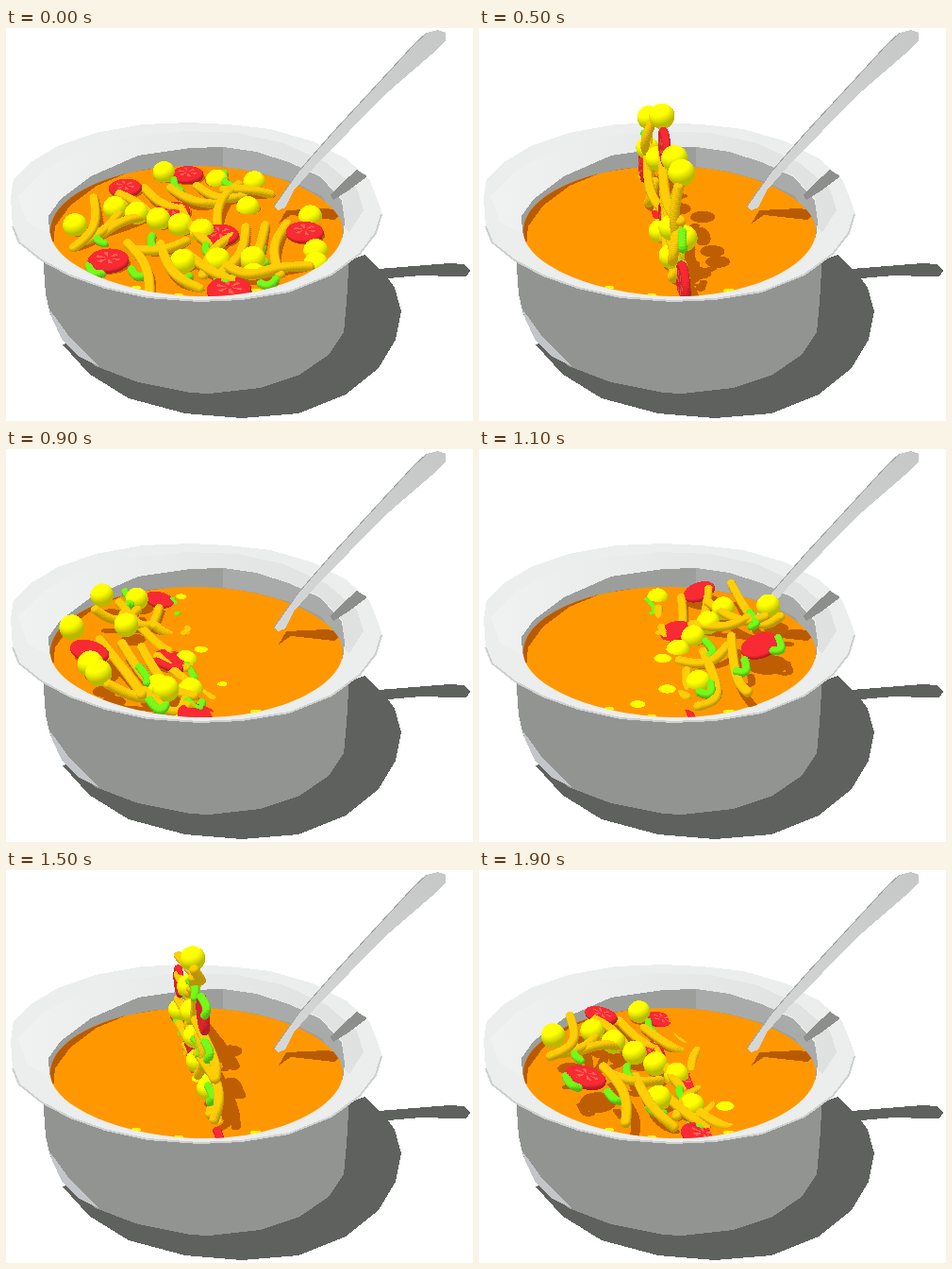
Animation, 495 px wide and 416 px high, one loop 2 s. Source, as an HTML page with a canvas:

```html
<!DOCTYPE html>
<html lang="en">
<head>
<meta charset="utf-8">
<title>Soup bowl</title>
<style>
  html, body { margin: 0; width: 100%; height: 100%; overflow: hidden; background: #fff; }
  svg, canvas { position: absolute; left: 0; top: 0; width: 495px; height: 416px; }
  canvas { clip-path: path("M0 0H495V215H357C357 252 290 284 210 284S47 252 47 215H0Z"); }
</style>
</head>
<body>
<svg viewBox="0 0 495 416" shape-rendering="crispEdges">
  <defs>
    <linearGradient id="rim">
      <stop offset="0" stop-color="#f0f1f1"/><stop offset="1" stop-color="#dfe1e1"/>
    </linearGradient>
    <linearGradient id="spoon" x1="1" y1="0" x2="0" y2="1">
      <stop offset="0" stop-color="#c6c8c7"/><stop offset="1" stop-color="#d6d8d7"/>
    </linearGradient>
    <clipPath id="soup">
      <path d="M47 215C47 177 115 146 200 146S357 180 357 215 290 284 210 284 47 252 47 215Z"/>
    </clipPath>
  </defs>

  <path fill="#5f615f" d="M60 335L88 366 130 392 190 408 250 413 310 408 360 388 395 360 413 330 419 300 412 275 405 265 440 262 475 263 488 263 492 257 485 250 470 249 395 255 380 240 200 300Z"/>
  <path fill="#929491" d="M39 240L42 282 47 303 60 330 95 358 140 375 195 386 215 387 270 381 311 367 342 346 358 322 361 290 364 240Z"/>
  <path fill="#c3c6c9" d="M46 298L53 307 68 328 98 358 78 348 60 331 49 308Z"/>

  <path fill="#eceded" d="M5 180L8 160 25 143 55 125 95 111 145 102 195 100 235 102 280 107 325 120 360 138 385 160 395 185 399 197 393 218 375 240 345 262 300 280 250 288 205 290 150 286 105 276 68 263 38 247 14 227 7 210Z"/>
  <path fill="none" stroke="#cfd1d0" stroke-width="2" d="M7 210L14 227 38 246 68 262 105 275 150 285 205 289 250 287 300 279 345 261 375 239 392 217 398 197"/>
  <path fill="url(#rim)" d="M13 178L39 151 75 132 125 116 190 109 245 111 295 122 340 143 372 170 379 193 364 216 357 210 357 182 333 156 280 135 230 126 195 127 140 136 90 158 55 184 45 218 22 205Z"/>

  <path fill="#9c9e9c" d="M46 217L45 199 58 181 90 157 140 135 195 127 230 126 265 131 300 142 334 158 356 183 359 205 357 222 200 200Z"/>
  <path fill="#a9abaa" d="M230 126L265 131 300 142 334 158 356 183 359 205 357 215 335 178 305 163 265 152 230 147Z"/>
  <path fill="#8d8f8d" d="M344 177L355 165 372 150 383 157 363 172 347 182Z"/>

  <g clip-path="url(#soup)">
    <path fill="#ff9800" d="M0 120H400V300H0Z"/>
    <path fill="#b85b00" d="M40 140H205L170 147 130 153 96 167 68 188 52 210 50 232 40 232Z"/>
    <path fill="#b85b00" d="M289 207L297 193 340 191 360 194 348 203 302 198Z"/>
    <g fill="#ff0">
      <ellipse cx="138" cy="275" rx="5" ry="2.5"/><ellipse cx="183" cy="283" rx="5" ry="2"/><ellipse cx="265" cy="278" rx="6" ry="2.5"/>
    </g>
  </g>
  <path fill="url(#spoon)" d="M284 189L310 152 347 110 384 70 432 18 446 5 458 2 466 5 466 13 458 22 400 72 364 109 327 147 305 172 296 190 289 193Z"/>
  <path fill="none" stroke="#a2a4a3" d="M284 189L310 152 347 110 384 70 432 18 446 5"/>
</svg>
<canvas width="495" height="416"></canvas>

<script>
const W = 495, H = 416;
const CX = 199, CY = 220;                // soup centre on screen
const VX = 247, VY = 208, DIST = 1200;   // vanishing point and camera distance
const FLAT = 0.48, UP = 0.87;            // camera elevation
const AX = 0.2, AY = 0.98;               // flip axis in the soup plane
const LIGHT = [-0.29, 0.73, 0.61];
const STEPS = 20, STEP_MS = 100;

const YELLOW = [255, 255, 0], PASTA = [255, 206, 8], GREEN = [118, 250, 25];
const RED = [250, 42, 52], SEED = [255, 100, 80];

const mix = (a, b, u) => a + (b - a) * u;
let seed = 7;
const random = () => (seed = seed * 16807 % 2147483647) / 2147483647;

const local = (X, Y, h) => ({ t: X * AX + Y * AY, s: X * AY - Y * AX, h });

// Soup position of a point seen on screen while everything lies flat
function place(x, y, h) {
  const m = (y - VY) / DIST;
  const Y = (m * (DIST - FLAT * h) - CY + VY + UP * h) / (FLAT + UP * m);
  const X = (x - VX) * (1 - (FLAT * h + UP * Y) / DIST) + VX - CX;
  return local(X, Y, h);
}

const dots = [], discs = [];
const addDot = (p, r, color) => dots.push({ p, r, color });

// Calls make(x, y, u) at n even places along a screen line
function row(n, x0, y0, x1, y1, make) {
  for (let i = 0; i < n; i++) {
    const u = i / (n - 1);
    make(mix(x0, x1, u), mix(y0, y1, u), u);
  }
}

const ball = h => (x, y) => addDot(place(x, y, h), 13, YELLOW);

function tomato(x, y) {
  const p = place(x, y, 4), r = 10 + y / 35;
  discs.push({ p, r });
  for (let a = 0; a < 2 * Math.PI; a += 0.1) {
    addDot({ t: p.t + r * Math.cos(a), s: p.s + r * Math.sin(a), h: p.h }, 4, RED);
  }
}

// A bent tube around a centre, arching out of the soup
function tube(x, y, deg, length, bow, arch, r, color) {
  const a = deg * Math.PI / 180, dx = Math.cos(a), dy = Math.sin(a);
  const n = Math.ceil(length / 1.5);
  for (let k = 0; k <= n; k++) {
    const along = (k / n - 0.5) * length, bend = Math.sin(Math.PI * k / n);
    const side = bow * (bend - 0.5);
    addDot(place(x + dx * along - dy * side, y + dy * along + dx * side, 2 + arch * bend), r, color);
  }
}

const noodle = (deg0, deg1, length) => (x, y, u) =>
  tube(x, y, mix(deg0, deg1, u), length, mix(-11, 11, random()), mix(3, 10, random()), 5, PASTA);
const chive = (deg0, deg1) => (x, y, u) =>
  tube(x, y, mix(deg0, deg1, u), 16, 4, 2, 4.2, GREEN);

[185, 254, 297, 341, 14].forEach(deg => {
  const a = deg * Math.PI / 180, r = 126 + 20 * Math.abs(Math.sin(a));
  const X = r * Math.cos(a);
  addDot(local(X, r * Math.sin(a), X < 0 ? 7 : 0), 13, YELLOW);
});
row(5, 115, 190, 207, 214, ball(7));
row(3, 187, 247, 261, 244, ball(6));
row(2, 223, 161, 256, 190, ball(1));
row(2, 262, 262, 328, 250, ball(-3));

row(3, 126, 169, 226, 219, tomato);
row(2, 192, 155, 316, 216, tomato);
row(2, 108, 246, 236, 277, tomato);

row(3, 87, 208, 127, 206, noodle(112, 160, 57));
row(5, 138, 187, 255, 172, noodle(35, 5, 50));
row(3, 165, 232, 231, 187, noodle(-10, 115, 52));
row(5, 144, 255, 290, 255, noodle(68, -8, 62));
row(4, 222, 238, 289, 233, noodle(128, 98, 54));

row(5, 93, 257, 278, 270, chive(35, -15));
row(4, 98, 222, 271, 240, chive(60, 80));
row(2, 180, 165, 233, 161, chive(70, 60));

const ctx = document.querySelector("canvas").getContext("2d");
const image = ctx.createImageData(W, H);
const depth = new Float32Array(W * H);
let cos = 1, sin = 0;

function view(X, Y, Z) {
  const d = FLAT * Z + UP * Y, k = DIST / (DIST - d);
  return {
    X, Y, Z, d, k,
    x: VX + k * (CX + X - VX),
    y: VY + k * (CY + FLAT * Y - UP * Z - VY)
  };
}

function project({ t, s, h }) {
  const across = s * cos - h * sin;
  return view(t * AX + across * AY, t * AY - across * AX, s * sin + h * cos);
}

function put(i, [r, g, b], light) {
  const o = i * 4, px = image.data;
  px[o] = r * light; px[o + 1] = g * light; px[o + 2] = b * light; px[o + 3] = 255;
}

function eachPixel(x, y, rx, ry, fn) {
  for (let j = Math.max(0, Math.ceil(y - ry)); j <= Math.min(H - 1, y + ry); j++)
    for (let i = Math.max(0, Math.ceil(x - rx)); i <= Math.min(W - 1, x + rx); i++)
      fn(i, j, i - x, j - y);
}

const shade = (nx, ny, nz) =>
  Math.min(1, 0.72 + 0.42 * Math.max(0, nx * LIGHT[0] + ny * LIGHT[1] + nz * LIGHT[2]));

// Keeps the nearest surface that lies above the soup
function plot(i, j, dy, dz, q, color, light) {
  const at = j * W + i, d = q.d + dz;
  if (q.Z - UP * dy + FLAT * dz < 0 || d <= depth[at]) return;
  depth[at] = d;
  put(at, color, light);
}

function drawShadow(q, r) {
  if (q.Z <= 0) return;
  const { x, y } = view(q.X + 0.31 * q.Z, q.Y - 0.2 * q.Z, 0);
  eachPixel(x, y, r, r * FLAT, (i, j, dx, dy) => {
    const inSoup = ((i - 202) / 154) ** 2 + ((j - 220) / 73) ** 2 < 1;
    if (inSoup && dx * dx + (dy / FLAT) ** 2 < r * r) put(j * W + i, [190, 94, 0], 1);
  });
}

function drawDot(q, radius, color) {
  const r = radius * q.k;
  eachPixel(q.x, q.y, r, r, (i, j, dx, dy) => {
    const zz = r * r - dx * dx - dy * dy;
    if (zz < 0) return;
    const dz = Math.sqrt(zz);
    plot(i, j, dy, dz, q, color, shade(dx / r, -dy / r, dz / r));
  });
}

// Only the upper face (side 1) shows the seeds
function drawFace({ p, r: radius }, side) {
  const q = project({ t: p.t, s: p.s, h: p.h + side * 3.6 }), r = radius * q.k;
  const nx = -sin * AY, ny = UP * cos - FLAT * sin * AX, nz = FLAT * cos + UP * sin * AX;
  if (nz * side < 0.02) return;
  const light = shade(nx * side, ny * side, nz * side);
  eachPixel(q.x, q.y, r, r, (i, j, dx, dy) => {
    const dz = (ny * dy - nx * dx) / nz;
    const dist = Math.hypot(dx, dy, dz) / r;
    if (dist > 1) return;
    const along = dx * AX + dy * FLAT * AY + dz * UP * AY;
    const across = dx * AY * cos
      - dy * (UP * sin + FLAT * AX * cos) + dz * (FLAT * sin - UP * AX * cos);
    const seeded = side > 0 && dist > 0.2 && dist < 0.72 &&
      Math.cos(6 * Math.atan2(across, along)) > 0.35;
    plot(i, j, dy, dz, q, seeded ? SEED : RED, light);
  });
}

function draw(step) {
  const angle = step / STEPS * 2 * Math.PI;
  cos = Math.cos(angle);
  sin = Math.sin(angle);
  image.data.fill(0);
  depth.fill(-1e9);
  const shown = dots.map(({ p, r, color }) => ({ q: project(p), r, color }));
  shown.forEach(({ q, r }) => drawShadow(q, r));
  discs.forEach(({ p, r }) => {
    for (let k = -r; k <= r; k += 2) {
      const half = Math.sqrt(r * r - k * k);
      for (let m = -half; m <= half; m += 3) {
        drawShadow(project({ t: p.t + k, s: p.s + m, h: p.h }), 4);
      }
    }
  });
  shown.forEach(({ q, r, color }) => drawDot(q, r, color));
  discs.forEach(disc => { drawFace(disc, 1); drawFace(disc, -1); });
  ctx.putImageData(image, 0, 0);
}

const start = performance.now();
let last = -1;
function tick() {
  const step = Math.floor((performance.now() - start) / STEP_MS) % STEPS;
  if (step !== last) draw(last = step);
  requestAnimationFrame(tick);
}
tick();
</script>
</body>
</html>
```
